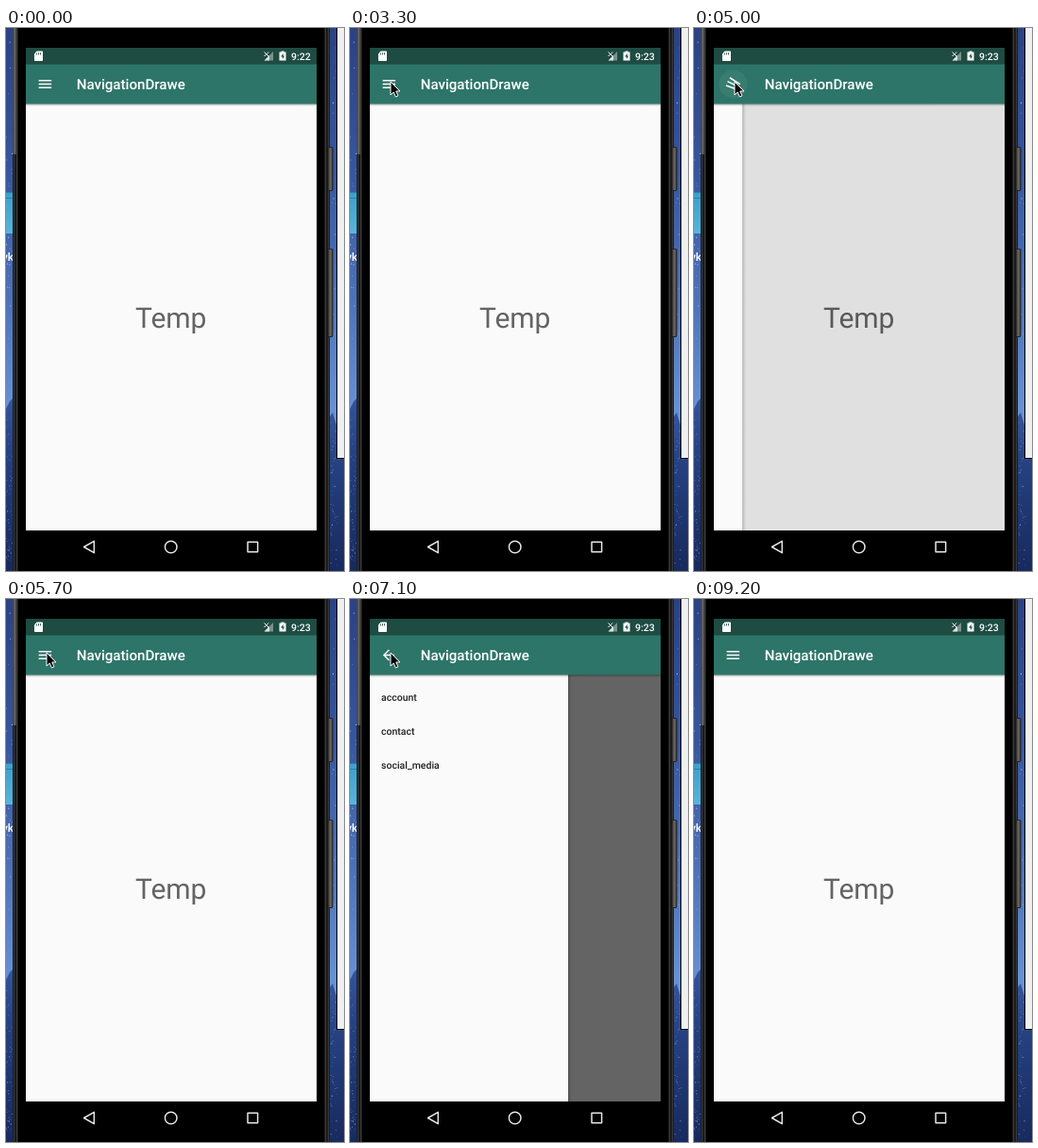
These frames come from a looping animation (358x576 px, 9300 ms). An HTML page:

```html
<!DOCTYPE html>
<html lang="en">
<head>
<meta charset="utf-8">
<title>Navigation drawer</title>
<style>
html, body { margin: 0; width: 100%; height: 100%; overflow: hidden; background: #000; }
svg { display: block; width: 358px; height: 576px; }
text { font-family: Roboto, sans-serif; text-rendering: geometricPrecision; }
.medium { font-weight: 500; }
</style>
</head>
<body>
<svg viewBox="0 0 358 576" xmlns="http://www.w3.org/2000/svg">
  <defs>
    <linearGradient id="sky" x2="0" y2="1">
      <stop offset="0" stop-color="#2a4284"/>
      <stop offset=".25" stop-color="#36559c"/>
      <stop offset=".5" stop-color="#4d72b8"/>
      <stop offset=".7" stop-color="#6791d4"/>
      <stop offset="1" stop-color="#6791d4"/>
    </linearGradient>
    <linearGradient id="hill" x2="0" y2="1">
      <stop offset="0" stop-color="#35549a"/>
      <stop offset=".35" stop-color="#24407f"/>
      <stop offset="1" stop-color="#182a5e"/>
    </linearGradient>
    <linearGradient id="folder" x2="0" y2="1">
      <stop offset="0" stop-color="#3f9fc9"/>
      <stop offset="1" stop-color="#58b4da"/>
    </linearGradient>
    <linearGradient id="metal" x2="1">
      <stop offset="0" stop-color="#3c3a37"/>
      <stop offset=".6" stop-color="#6d6963"/>
      <stop offset="1" stop-color="#35332f"/>
    </linearGradient>
    <linearGradient id="down" x2="0" y2="1">
      <stop offset="0" stop-opacity=".38"/>
      <stop offset="1" stop-opacity="0"/>
    </linearGradient>
    <linearGradient id="side">
      <stop offset="0" stop-opacity=".18"/>
      <stop offset="1" stop-opacity="0"/>
    </linearGradient>
    <clipPath id="page"><rect x="21" y="80" width="308" height="453"/></clipPath>
  </defs>

  <!-- desktop -->
  <rect width="358" height="576" fill="url(#sky)"/>
  <g id="stars" fill="#a9bde6"></g>
  <path d="M0 404L4 396L8 392V576H0Z" fill="url(#hill)"/>
  <path d="M340 416L346 408L352 428L358 440V576H340Z" fill="url(#hill)"/>
  <g id="snow" fill="#5f80c2"></g>
  <rect x="-6" y="175" width="14" height="43" fill="url(#folder)"/>
  <path d="M0 174.5H8M0 180.5H8" stroke="#2b7fa9"/>
  <text class="medium" x="-4" y="247" font-size="12" fill="#fff">yk</text>
  <rect x="350.5" y="-2" width="12" height="458.5" fill="#f0f0f0" stroke="#000"/>

  <!-- phone -->
  <rect x="7" width="336" height="576" fill="#1b1b1c"/>
  <rect x="7" width="4" height="134" fill="url(#metal)"/>
  <path d="M8.5 134V576M11.5 0V576M338.5 0V576M341.5 0V576" stroke="#3a3938"/>
  <rect x="13" width="324" height="576" fill="#000"/>
  <g fill="url(#metal)" stroke="#191817" stroke-width=".8">
    <rect x="341" y="126.5" width="5" height="46" rx="1"/>
    <rect x="341" y="234.5" width="5" height="93" rx="1"/>
  </g>

  <!-- page -->
  <rect x="21" y="80" width="308" height="453" fill="#fafafa"/>
  <text x="174.7" y="318" font-size="30" text-anchor="middle" fill="#646464">Temp</text>
  <g clip-path="url(#page)">
    <rect id="scrim" x="21" y="80" width="308" height="453"/>
    <g id="drawer">
      <rect x="210" y="80" width="4" height="453" fill="url(#side)"/>
      <rect y="80" width="210" height="453" fill="#fafafa"/>
      <g class="medium" font-size="10.5" fill="#212121">
        <text x="12" y="108">account</text>
        <text x="12" y="144">contact</text>
        <text x="12" y="180">social_media</text>
      </g>
    </g>
    <rect x="21" y="80" width="308" height="3" fill="url(#down)"/>
  </g>

  <!-- bars -->
  <rect x="21" y="21" width="308" height="18" fill="#1e4b42"/>
  <rect x="21" y="38.5" width="308" height="42" fill="#2d7568"/>
  <path d="M32.6 24.5H38.3Q39 24.5 39 25.2V34.3Q39 35 38.3 35H30.7Q30 35 30 34.3V27.2Z" fill="#fff"/>
  <path d="M32.5 26.5V28.5M34.5 26V28.5M36.5 26V28.5" stroke="#1e4b42" stroke-width=".8"/>
  <path d="M283 25V34.5H273.5Z" fill="#fff" opacity=".4"/>
  <path d="M273.5 34.5L279 29V34.5Z" fill="#fff" opacity=".75"/>
  <path d="M273.5 25.5L278 30M278 25.5L273.5 30" stroke="#fff"/>
  <path d="M291.5 24.5H294.5V25.5H296.5V34.5H289.5V25.5H291.5Z" fill="#fff"/>
  <path d="M293.5 26.8L291.2 30.6H292.8V33.2L295 29.4H293.5Z" fill="#1e4b42"/>
  <text id="clock" class="medium" x="302" y="33.6" font-size="10.5" fill="#fff">9:22</text>
  <text class="medium" x="74.7" y="65.2" font-size="15.1" fill="#fff">NavigationDrawe</text>
  <circle id="ripple" cx="41.5" cy="59.5" r="15" fill="#fff"/>
  <path id="icon" fill="none" stroke="#fff" stroke-width="1.5"/>

  <g fill="none" stroke="#e6e6e6" stroke-width="1.5" stroke-linejoin="round">
    <path d="M82.5 550.5L93.3 544.3V556.7Z"/>
    <circle cx="174.7" cy="550.5" r="6.3"/>
    <rect x="256" y="545.2" width="10.6" height="10.6"/>
  </g>

  <path id="cursor" d="M0 0V14L3.2 11L5.4 16L7.9 14.9L5.8 10H10Z" fill="#000" stroke="#fff" stroke-width="1" stroke-linejoin="round"/>
</svg>
<script>
const LOOP = 9300, STEP = 100, WIDTH = 210, DP = 0.75;
const $ = id => document.getElementById(id);
const lerp = (a, b, t) => a + (b - a) * t;
const clamp = t => Math.max(0, Math.min(1, t));
const settle = t => 1 - (1 - clamp(t)) ** 5;

// each tap: time, drawer position to settle at
const taps = [[4539, 1], [4837, 0], [5859, 1], [7781, 0]];
// cursor: time, x, y
const route = [[400, 362, 3], [1000, 180, 45], [1400, 99, 83], [1600, 99, 83],
               [2100, 43, 57], [8500, 43, 57], [9000, 362, 9]];

function scatter(id, count, top, height, seed) {
  const rand = () => (seed = (seed * 16807) % 2147483647) / 2147483647;
  let out = "";
  for (let i = 0; i < count; i++) {
    const x = i % 2 ? 344 + rand() * 7 : rand() * 7;
    const y = top + rand() * height;
    out += `<circle cx="${x.toFixed(1)}" cy="${y.toFixed(1)}" r="${(0.3 + rand() * 0.4).toFixed(2)}"/>`;
  }
  $(id).innerHTML = out;
}

function drawerAt(time) {
  let from = 0, pos = 0, mirror = false, tapped = Infinity;
  taps.forEach(([start, to], i) => {
    if (time < start) return;
    const end = Math.min(time, i + 1 < taps.length ? taps[i + 1][0] : LOOP);
    const span = (Math.abs(to - from) + 1) * 256;
    pos = lerp(from, to, settle((end - start) / span));
    if (pos === 1) mirror = true;
    if (pos === 0) mirror = false;
    from = pos;
    tapped = time - start;
  });
  return { pos, mirror, tapped };
}

// three bars that turn into a back arrow
function drawIcon(p, mirror) {
  const cut = Math.SQRT1_2 * p;
  const head = lerp(18, 8 * Math.SQRT2, p);
  const shaft = lerp(18, 16, p);
  const gap = lerp(5, -Math.SQRT1_2, p);
  const dx = head * Math.cos(p * Math.PI / 4);
  const dy = head * Math.sin(p * Math.PI / 4);
  const edge = -shaft / 2;
  const turn = lerp(-180, 0, p) * (mirror ? -1 : 1);
  const n = v => (v * DP).toFixed(3);
  $("icon").setAttribute("d",
    `M${n(edge + cut)} 0h${n(shaft - 2 * cut)}` +
    `M${n(edge)} ${n(gap)}l${n(dx)} ${n(dy)}` +
    `M${n(edge)} ${n(-gap)}l${n(dx)} ${n(-dy)}`);
  $("icon").setAttribute("transform", `translate(41.4 59.5) rotate(${turn})`);
}

function moveCursor(time) {
  const i = route.findIndex(stop => stop[0] > time);
  const shown = i > 0;
  $("cursor").setAttribute("visibility", shown ? "visible" : "hidden");
  if (!shown) return;
  const [a, b] = [route[i - 1], route[i]];
  const t = (time - a[0]) / (b[0] - a[0]);
  $("cursor").setAttribute("transform", `translate(${lerp(a[1], b[1], t)} ${lerp(a[2], b[2], t)})`);
}

function render(time) {
  const { pos, mirror, tapped } = drawerAt(time);
  $("drawer").setAttribute("transform", `translate(${21 + WIDTH * (pos - 1)} 0)`);
  $("drawer").setAttribute("visibility", pos > 0 ? "visible" : "hidden");
  $("scrim").setAttribute("opacity", 0.6 * pos ** 0.9);
  $("ripple").setAttribute("opacity", tapped < 80 ? 0 : 0.06 * clamp((480 - tapped) / 250));
  $("clock").textContent = time < 3000 ? "9:22" : "9:23";
  drawIcon(pos, mirror);
  moveCursor(time);
}

scatter("stars", 44, 4, 330, 71);
scatter("snow", 110, 415, 155, 29);

const begin = performance.now();
function tick() {
  const time = (performance.now() - begin) % LOOP;
  render(Math.floor(time / STEP) * STEP);
  requestAnimationFrame(tick);
}
tick();
</script>
</body>
</html>
```
